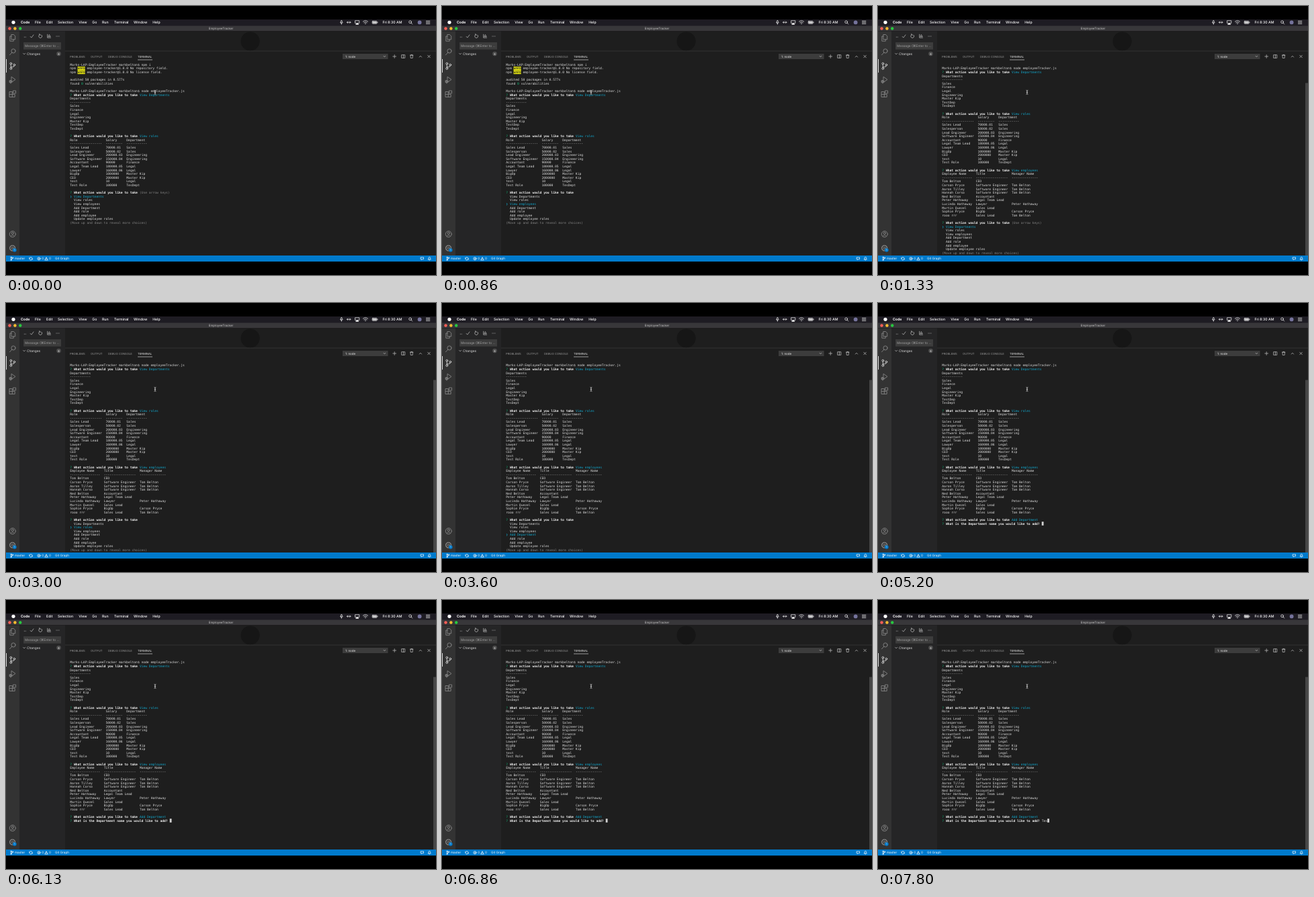
Write an HTML page that moves like this. It is 640x400 px and loops after 8 s.

```html
<!DOCTYPE html>
<html lang="en">
<head>
<meta charset="utf-8">
<title>EmployeeTracker</title>
<style>
html, body { margin: 0; width: 100%; height: 100%; overflow: hidden; background: #000; }
svg { display: block; width: 640px; height: 400px; }
text { font-family: Inter, "DejaVu Sans", sans-serif; text-rendering: geometricPrecision; fill: #ccc; }
#term text { font: 4.65px "DejaVu Sans Mono", monospace; fill: #dedede; }
#term .b { font-weight: bold; fill: #f2f2f2; }
#term .c { fill: #11a8cd; }
#term .g { fill: #0dbc79; }
#term .d { fill: #858585; }
#term .k { fill: #1e1e1e; }
.line { fill: none; stroke: #c5c5c5; stroke-width: .7; stroke-linecap: round; stroke-linejoin: round; }
.dim { stroke: #858585; stroke-width: .9; }
.white { stroke: #fff; }
</style>
</head>
<body>
<svg viewBox="0 0 640 400">
  <rect width="640" height="400"/>
  <rect y="20" width="640" height="10" fill="#1e1c23"/>
  <rect y="29.5" width="640" height="8" fill="#38373a"/>
  <rect y="37.5" width="20" height="333.5" fill="#333"/>
  <rect x="20" y="37.5" width="68" height="333.5" fill="#252526"/>
  <rect x="88" y="37.5" width="552" height="333.5" fill="#1e1e1e"/>
  <circle cx="363.5" cy="52.5" r="14" fill="#161616"/>
  <rect x="88" y="66.7" width="552" height=".6" fill="#414141"/>
  <rect y="371" width="640" height="9" fill="#007acc"/>

  <!-- menu bar -->
  <circle cx="11" cy="24.3" r="2.6" fill="#fff"/>
  <g class="line white">
    <rect x="498.3" y="21.6" width="2" height="3.6" rx="1"/>
    <path d="M497.4 24.5q1.9 3 3.8 0M499.3 26v1.3M507.5 24.3h5.4M508.8 23l-1.3 1.3 1.3 1.3M511.6 23l1.3 1.3-1.3 1.3"/>
    <path d="M521 25.6h-1.4v-3.8h6.2v3.8h-1.4"/>
    <path d="M520.8 27.2l1.9-2.3 1.9 2.3z" fill="#fff"/>
    <path d="M531.4 23.2q3.6-3 7.2 0M532.8 24.8q2.2-1.8 4.4 0M534.4 26.3l.6.4.6-.4"/>
    <rect x="545.2" y="22.5" width="6.8" height="3.8" rx=".7"/>
    <path d="M546.4 24.4h4.4" stroke-width="2"/>
    <path d="M553 23.9v1"/>
    <circle cx="601.6" cy="23.8" r="1.9"/>
    <path d="M603 25.2l1.7 1.8M625.4 22.4h5.4M625.4 24.4h5.4M625.4 26.4h5.4"/>
  </g>
  <circle cx="615.6" cy="24.4" r="2.9" fill="#75739c"/>

  <circle cx="5.5" cy="33.5" r="2.2" fill="#ff5f57"/>
  <circle cx="13.4" cy="33.5" r="2.2" fill="#febc2e"/>
  <circle cx="21.2" cy="33.5" r="2.2" fill="#28c840"/>

  <!-- activity bar -->
  <g class="line dim">
    <path d="M8.2 42.5h3.3l2.2 2.2v5H8.2zM8.2 45H5.8v7.2h5.5v-2.4"/>
    <circle cx="11" cy="66.9" r="3.1"/><path d="M8.8 69.2l-3.3 3.6"/>
    <path d="M8 109.4v-4.2l6 4.2-4.6 3.2M7 110.5v4.5M5 111h4M5 113h4"/>
    <circle cx="7" cy="112.5" r="1.8"/>
    <path d="M5.4 127.5h3.9v7.8H5.4zM5.4 131.4h7.8v3.9H9.3M10.8 126h3.8v3.8h-3.8z"/>
    <circle cx="9.8" cy="339.2" r="4.5"/><circle cx="9.8" cy="337.8" r="1.6"/>
    <path d="M7 342.4q2.8-3.6 5.6 0"/>
    <circle cx="9.6" cy="360" r="3.9" stroke-dasharray="2 1.06" stroke-width="1.4"/>
    <circle cx="9.6" cy="360" r="1.5"/>
  </g>
  <rect y="79" width=".8" height="20" fill="#fff"/>
  <g class="line white">
    <circle cx="7.3" cy="85.6" r="1.4"/><circle cx="7.3" cy="93" r="1.4"/><circle cx="12.3" cy="87.6" r="1.4"/>
    <path d="M7.3 87v4.6M12.3 89q0 1.9-5 1.9"/>
  </g>
  <circle cx="12.8" cy="363" r="2.8" fill="#007acc"/>

  <!-- source control -->
  <g class="line">
    <path d="M36.2 45.4l1.6 1.7 3.2-4.2"/>
    <path d="M53 43.2a2.5 2.5 0 1 1-3.2-.4M49.8 41.4v1.7h1.7"/>
    <path d="M61.7 42.2v5h4.8M63 45.2l1.4-2.6 1.6 2.6z"/>
    <path d="M27.3 46.2h.01M29.2 46.2h.01M75 45h.01M77 45h.01M79 45h.01" stroke-width=".9"/>
    <path d="M25.6 70.4l1.5 1.5 1.5-1.5"/>
  </g>
  <rect x="26" y="54" width="56" height="10.6" fill="#3c3c3c"/>
  <circle cx="78.5" cy="71.1" r="3.3" fill="#4d4d4d"/>

  <!-- panel header -->
  <rect x="196" y="79.7" width="22" height=".6" fill="#e7e7e7"/>
  <rect x="501" y="71" width="67.5" height="8" fill="#3c3c3c"/>
  <g class="line">
    <path d="M562 74.3l1.4 1.4 1.4-1.4M575.8 75h4.8M578.2 72.6v4.8M589 72.7h4.8v4.6H589zM591.4 72.7v4.6"/>
    <path d="M601.4 73.2h4.6M602.9 73.2v-.8h1.6v.8M602 73.2l.2 4.2h3l.2-4.2M615.2 76l1.7-1.8 1.7 1.8M627.7 73.2l3.6 3.6M631.3 73.2l-3.6 3.6"/>
  </g>

  <!-- status bar -->
  <g class="line white" stroke-width=".6">
    <circle cx="7.6" cy="373.8" r=".8"/><circle cx="7.6" cy="377.6" r=".8"/><circle cx="10" cy="374.6" r=".8"/>
    <path d="M7.6 374.6v2.2M10 375.4q0 1-2.4 1"/>
    <path d="M34.9 375.4a2.2 2.2 0 0 1 4.2-.5M39.1 376a2.2 2.2 0 0 1-4.2.5M34.3 374.6l.6.9.9-.5M39.7 376.7l-.6-.9-.9.5"/>
    <circle cx="49" cy="375.7" r="2.1"/><path d="M48.2 374.9l1.6 1.6M49.8 374.9l-1.6 1.6"/>
    <path d="M57.9 377.5l2.1-3.8 2.1 3.8zM60 375v1.1"/>
    <path d="M617.5 373.8h4v2.6h-2l-1.1 1.1v-1.1h-.9z"/>
    <path d="M628.3 376.8h4l-.7-1v-1.2a1.3 1.3 0 0 0-2.6 0v1.2zM629.9 377.8h.8"/>
  </g>

  <g id="labels"></g>
  <g id="term"></g>
  <g class="line" stroke-width=".6"><path d="M220.8 125.2q1.1 0 1.1.8v4.6q0 .8-1.1.8M223 125.2q-1.1 0-1.1.8v4.6q0 .8 1.1.8M221.1 128.4h1.6"/></g>
</svg>
<script>
const LOOP = 8000, X0 = 95.3, CW = 2.8, LH = 5.6, TOP = 87.2;
const $ = id => document.getElementById(id);
const esc = s => s.replace(/&/g, '&amp;').replace(/</g, '&lt;');

// Interface labels: x, baseline, size, text, colour, extra attributes
const labels = [
  [22, 26.2, 5.2, 'Code', '#fff', 'font-weight="700"'],
  ...[[43, 'File'], [60, 'Edit'], [77, 'Selection'], [108.2, 'View'], [128.3, 'Go'], [143, 'Run'],
    [161, 'Terminal'], [190, 'Window'], [218.2, 'Help'], [560.5, 'Fri 8:30 AM']]
    .map(([x, s]) => [x, 26.2, 5.2, s, '#fff', 'font-weight="500"']),
  [320, 35.2, 4.5, 'EmployeeTracker', '#ccc', 'text-anchor="middle"'],
  [28, 61.1, 4.8, 'Message (⌘Enter to ...', '#a0a0a0'],
  [31, 72.9, 4.8, 'Changes', '#ddd'],
  [78.5, 72.6, 4, '8', '#fff', 'text-anchor="middle"'],
  [12.8, 364.3, 3.6, '1', '#fff', 'text-anchor="middle"'],
  [95, 77, 4.2, 'PROBLEMS', '#999'],
  [126, 77, 4.2, 'OUTPUT', '#999'],
  [152, 77, 4.2, 'DEBUG CONSOLE', '#999'],
  [196, 77, 4.2, 'TERMINAL', '#e7e7e7'],
  [505, 76.7, 4.5, '1: node', '#f0f0f0'],
  [13, 377.4, 4.7, 'master', '#fff'],
  [53.2, 377.4, 4.7, '0', '#fff'],
  [64, 377.4, 4.7, '0', '#fff'],
  [73, 377.4, 4.7, 'Git Graph', '#fff']
];
$('labels').innerHTML = labels.map(([x, y, size, s, fill, extra = '']) =>
  `<text x="${x}" y="${y}" font-size="${size}" style="fill:${fill}" ${extra}>${esc(s)}</text>`).join('');

// A terminal line is a list of [column, text, style]
const plain = s => [[0, s]];
const row = cols => s => s.split('|').map((t, i) => [cols[i], t]).filter(p => p[1]);
const rule = widths => widths.map(n => '-'.repeat(n)).join('|');
const ask = (answer = '', style = 'c') =>
  [[0, '?', 'g'], [2, 'What action would you like to take', 'b'], [37, answer, style]];
const warn = s => [[0, 'npm'], [4, 'WARN', 'k'], [9, 'employee-tracker@1.0.0 ' + s]];
const host = 'Marks-LAP:EmployeeTracker markbelton$ ';

const install = [
  plain(host + 'npm i'), warn('No repository field.'), warn('No license field.'), [],
  plain('audited 50 packages in 0.577s'),
  [[0, 'found'], [6, '0', 'g'], [8, 'vulnerabilities']]
];
const history = [
  [], plain(host + 'node employeeTracker.js'),
  ask('View Departments'),
  ...['Departments', '-'.repeat(11), 'Sales', 'Finance', 'Legal', 'Engineering', 'Master Kip', 'TestDep', 'TesDept'].map(plain),
  [], ask('View roles'),
  ...['Role|Salary|Department', rule([17, 9, 11]),
    'Sales Lead|70000.01|Sales', 'Salesperson|50000.02|Sales', 'Lead Engineer|200000.03|Engineering',
    'Software Engineer|150000.04|Engineering', 'Accountant|90000|Finance', 'Legal Team Lead|180000.05|Legal',
    'Lawyer|160000.06|Legal', 'BigOp|1000000|Master Kip', 'CEO|2000000|Master Kip', 'test|10|Legal',
    'Test Role|100000|TesDept'].map(row([0, 19, 30])),
  []
];
const staff = [
  ask('View employees'),
  ...['Employee Name|Title|Manager Name', rule([16, 17, 14]),
    'Tom Belton|CEO', 'Carson Pryce|Software Engineer|Tom Belton', 'Aaron Tilley|Software Engineer|Tom Belton',
    'Hannah Corso|Software Engineer|Tom Belton', 'Ned Belton|Accountant', 'Peter Hathaway|Legal Team Lead',
    'Lucinda Hathaway|Lawyer|Peter Hathaway', 'Martin Quezel|Sales Lead', 'Sophie Pryce|BigOp|Carson Pryce',
    'rooo rrr|Sales Lead|Tom Belton'].map(row([0, 18, 37])),
  []
];
const choices = ['View Departments', 'View roles', 'View employees', 'Add Department', 'Add role',
  'Add employee', 'Update employee roles'];
const menu = (pick, hint = '') => [
  ask(hint, 'd'),
  ...choices.map((s, i) => i === pick ? [[0, '❯', 'c'], [2, s, 'c']] : [[2, s]]),
  [[0, '(Move up and down to reveal more choices)', 'd']]
];
const cursor = col => [col, '', 'cursor'];
const question = 'What is the Department name you would like to add?';
const entry = typed => [ask('Add Department'),
  [[0, '?', 'g'], [2, question, 'b'], [53, typed], cursor(53 + typed.length)]];

const first = [...install, ...history], later = [...history, ...staff];
const hint = '(Use arrow keys)';
const steps = [
  [0, [...first, ...menu(0, hint)]],
  [130, [...first, ...menu(1)]],
  [800, [...first, ...menu(2)]],
  [1060, [...first, ask('View employees'), [cursor(0)]]],
  [1130, [...later, ...menu(0, hint)], true],
  [3000, [...later, ...menu(1)], true],
  [3200, [...later, ...menu(2)], true],
  [3530, [...later, ...menu(3)], true],
  [4460, [...later, ask('Add Department'), [cursor(0)]], true],
  [4530, [...later, ...entry('')], true],
  [7060, [...later, ...entry('T')], true],
  [7730, [...later, ...entry('Te')], true],
  [7800, [...later, ...entry('Tes')], true]
];

function segment([col, s, style = ''], y) {
  const x = X0 + col * CW;
  const block = (w, fill) => `<rect x="${x}" y="${y - LH / 2}" width="${w * CW}" height="${LH}" fill="${fill}"/>`;
  if (style === 'cursor') return block(1, '#d4d4d4');
  return (style === 'k' ? block(s.length, '#e5e510') : '') +
    `<text x="${x}" y="${y + 1.65}" class="${style}" style="white-space:pre">${esc(s)}</text>`;
}
const scrollbar = '<rect x="636" y="114.5" width="4" height="256.5" fill="#464646"/>';
$('term').innerHTML = steps.map(([, lines, scrolled]) =>
  `<g display="none">${scrolled ? scrollbar : ''}${lines.map((line, i) =>
    line.map(p => segment(p, TOP + i * LH)).join('')).join('')}</g>`).join('');

const screens = [...$('term').children];
const start = performance.now();
let shown = -1;
function draw() {
  const t = (performance.now() - start) % LOOP;
  const now = steps.findLastIndex(s => s[0] <= t);
  if (now !== shown) {
    screens.forEach((g, i) => g.setAttribute('display', i === now ? 'inline' : 'none'));
    shown = now;
  }
  requestAnimationFrame(draw);
}
draw();
</script>
</body>
</html>
```
